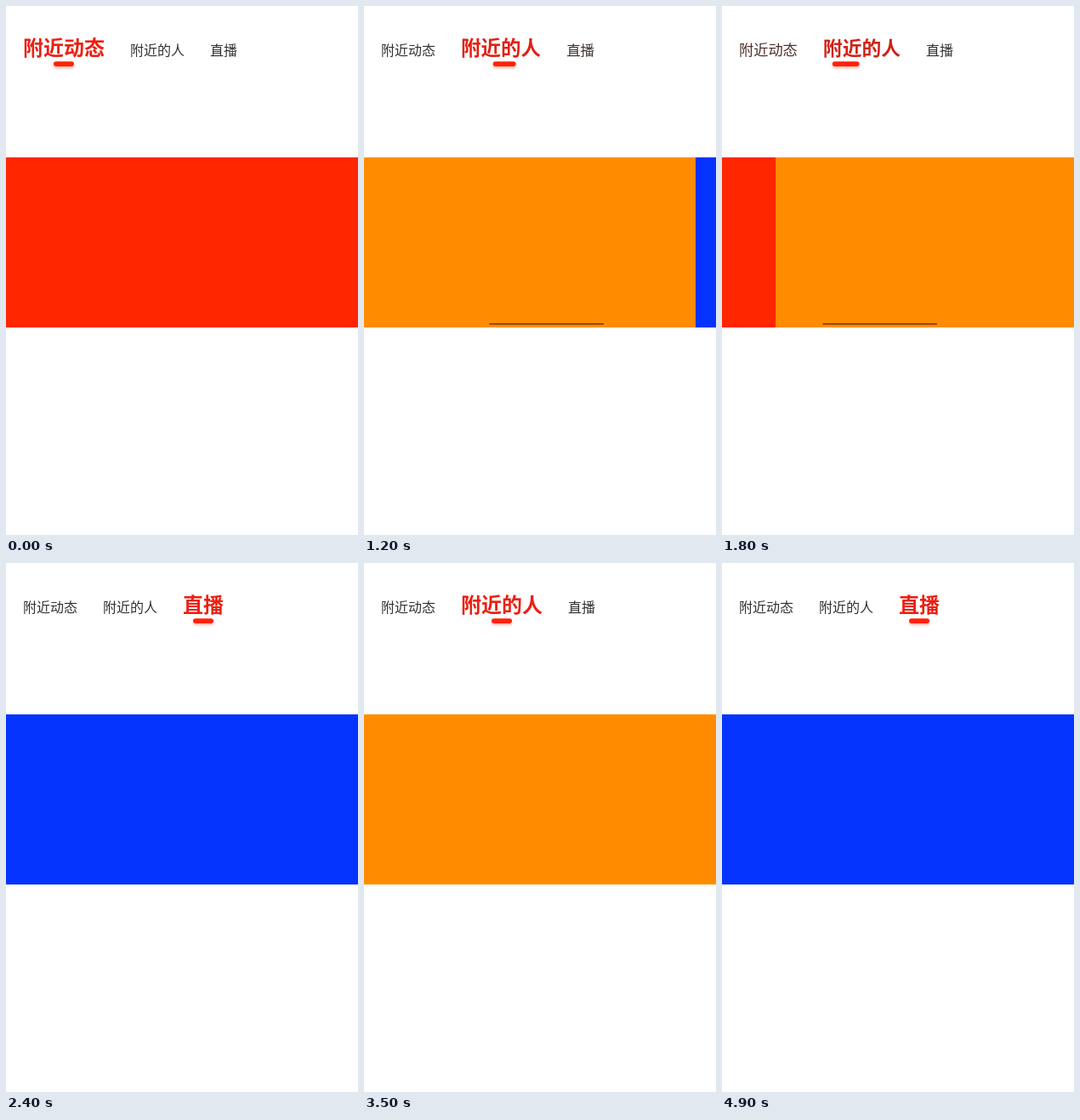
Animation of 414 by 622 pixels, one loop 5000 ms. Source, as an HTML page:

```html
<!DOCTYPE html>
<html lang="zh-CN">
<head>
<meta charset="utf-8">
<style>
  html, body { margin: 0; width: 100%; height: 100%; overflow: hidden; background: #fff; }
  svg { display: block; }
  text { font-family: "Noto Sans CJK SC", "Noto Sans CJK", "Noto Sans CJK JP", sans-serif; }
  #marker { filter: drop-shadow(0 2px 1.5px rgba(255, 38, 0, .35)); }
</style>
</head>
<body>
<svg width="414" height="622" viewBox="0 0 414 622">
  <g id="tabs"></g>
  <rect id="marker" y="65.3" height="5.6" rx="2.8" fill="#ff2208"/>
  <g id="pages"></g>
  <rect id="scrollbar" y="373" width="135" height="1.8" rx=".9" fill="#000" fill-opacity=".5"/>
</svg>
<script>
const LOOP = 5000, STEP = 100, WIDTH = 414, LEFT = 20, GAP = 30;
const SMALL = 16, LARGE = 24, MARKER = 24, STRETCH = 51;
const DARK = [51, 48, 48], RED = [236, 32, 18];
const labels = ["附近动态", "附近的人", "直播"];
const colors = ["#ff2600", "#ff8c00", "#0433ff"];
const drag = { start: 400, end: 2100 };

// time, page position
const keys = [
  [0, 0], [200, 1], [300, 1], [700, 1.292], [850, 1.35], [1200, 1.058],
  [1550, 0.72], [1800, 0.848], [2100, 1], [2400, 2], [2700, 1], [2800, 1],
  [3100, 0], [3200, 0], [3500, 1], [3600, 1], [3800, 2], [LOOP, 2]
];

const $ = id => document.getElementById(id);
const lerp = (a, b, t) => a + (b - a) * t;
const smooth = t => t * t * (3 - 2 * t);

function add(parent, tag, attrs, content = "") {
  const node = document.createElementNS("http://www.w3.org/2000/svg", tag);
  set(node, attrs);
  node.textContent = content;
  return parent.appendChild(node);
}

function set(node, attrs) {
  for (const name in attrs) node.setAttribute(name, attrs[name]);
}

const tabs = labels.map(label => add($("tabs"), "text", { y: 57.6 }, label));
const pages = colors.map(fill =>
  add($("pages"), "rect", { y: 178, width: WIDTH, height: 200, fill }));

function positionAt(time) {
  const i = keys.findIndex(key => key[0] > time);
  const [t0, p0] = keys[i - 1], [t1, p1] = keys[i];
  const t = (time - t0) / (t1 - t0);
  const dragging = time >= drag.start && time < drag.end;
  return lerp(p0, p1, dragging ? t : smooth(t));
}

function layout(position) {
  let x = LEFT;
  return labels.map((label, i) => {
    const active = Math.max(0, 1 - Math.abs(position - i));
    const size = lerp(SMALL, LARGE, active);
    const width = size * label.length;
    const item = { x, size, active, center: x + width / 2 };
    x += width + GAP;
    return item;
  });
}

function draw(time) {
  const position = positionAt(time);
  const items = layout(position);

  items.forEach(({ x, size, active }, i) => {
    const rgb = DARK.map((c, k) => Math.round(lerp(c, RED[k], active)));
    set(tabs[i], {
      x, "font-size": size, fill: `rgb(${rgb})`,
      "font-weight": active > 0.5 ? 600 : 400
    });
    set(pages[i], { x: Math.round((i - position) * WIDTH) });
  });

  // The marker heads for the place the next tab will have when selected.
  const from = Math.min(Math.floor(position), labels.length - 2);
  const t = position - from;
  const center = lerp(items[from].center, layout(from + 1)[from + 1].center, t);
  const width = MARKER + STRETCH * Math.min(t, 1 - t);
  set($("marker"), { x: center - width / 2, width });

  set($("scrollbar"), {
    x: position * WIDTH / 3 + 1.2,
    visibility: time >= drag.start && time <= drag.end ? "visible" : "hidden"
  });
}

const begin = performance.now();
function tick() {
  const time = (performance.now() - begin) % LOOP;
  draw(Math.floor(time / STEP) * STEP);
  requestAnimationFrame(tick);
}
tick();
</script>
</body>
</html>
```
